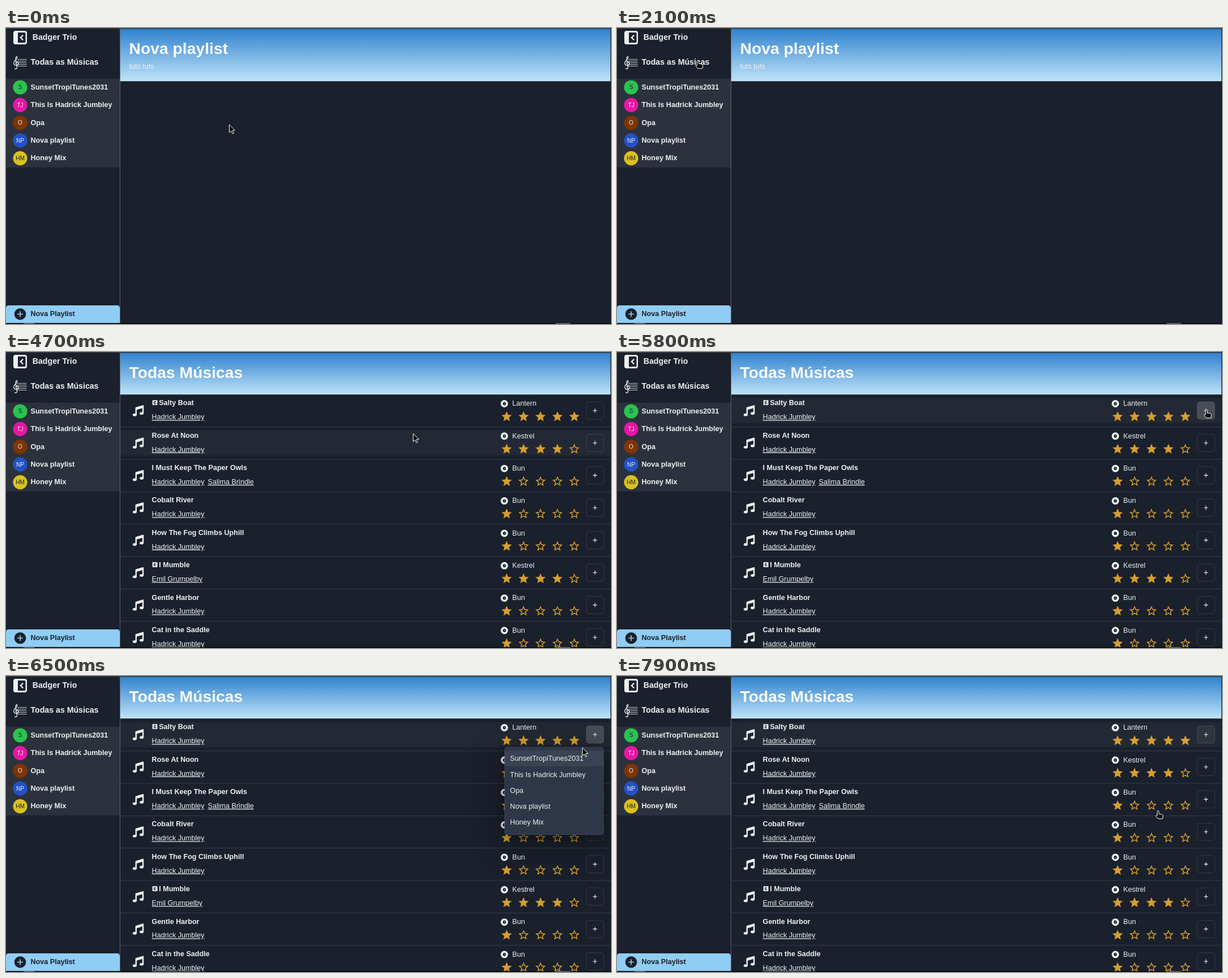
Write an HTML page that moves like this. It is 1069 by 524 pixels and loops after 8 s.

```html
<!DOCTYPE html>
<html lang="pt">
<head>
<meta charset="utf-8">
<style>
  html, body { margin: 0; width: 100%; height: 100%; overflow: hidden; background: #1a202c; }
  svg { display: block; width: 1069px; height: 524px; font: 12.58px "Liberation Sans", Arial, sans-serif; }
  text { fill: #eeeff0; }
  .bold { font-weight: bold; }
  .big { font-weight: bold; font-size: 14.15px; }
  .title { font-weight: bold; font-size: 28.3px; fill: #f8fbfe; }
  .link { text-decoration: underline; }
  .initials { font-size: 10.06px; text-anchor: middle; }
  .icon { fill: #eeeff0; }
  .gold { fill: #d69e2e; }
  .line { fill: #fff; fill-opacity: .16; }
  .box { stroke: #fff; stroke-opacity: .16; stroke-width: .8; }
  .cursor { fill: #000; stroke: #fff; stroke-width: 1; stroke-linejoin: round; }
  #panel { filter: drop-shadow(0 4px 8px rgba(0,0,0,.2)) drop-shadow(0 12px 31px rgba(0,0,0,.4)); }
</style>
</head>
<body>
<svg id="stage" viewBox="0 0 1069 524"></svg>
<script>
const ROW = 57.36, TOP = 75.3, ITEM = 28.3, MENU_TOP = 131.6;

const playlists = [
  ['SunsetTropiTunes2031', 'S', '#2ac350', '#1a202c'],
  ['This Is Hadrick Jumbley', 'TJ', '#e815a4', '#eeeff0'],
  ['Opa', 'O', '#7f3503', '#eeeff0'],
  ['Nova playlist', 'NP', '#2352c6', '#eeeff0'],
  ['Honey Mix', 'HM', '#dbc021', '#1a202c']
];
const star = 'Hadrick Jumbley';
const songs = [ // title, artists, album, rating, explicit
  ['Salty Boat', [star], 'Lantern', 5, true],
  ['Rose At Noon', [star], 'Kestrel', 4],
  ['I Must Keep The Paper Owls', [star, 'Salima Brindle'], 'Bun', 1],
  ['Cobalt River', [star], 'Bun', 1],
  ['How The Fog Climbs Uphill', [star], 'Bun', 1],
  ['I Mumble', ['Emil Grumpelby'], 'Kestrel', 4, true],
  ['Gentle Harbor', [star], 'Bun', 1],
  ['Cat in the Saddle', [star], 'Bun', 1]
];

const text = (x, y, s, cls = '', more = '') => `<text x="${x}" y="${y}" class="${cls}" ${more}>${s}</text>`;
const rect = (x, y, w, h, more = '') => `<rect x="${x}" y="${y}" width="${w}" height="${h}" ${more}/>`;
const use = (id, x, y, cls = 'icon') => `<use href="#${id}" x="${x}" y="${y}" class="${cls}"/>`;
const path = (id, scale, d) => `<path id="${id}" transform="scale(${scale})" d="${d}"/>`;

const defs = `<defs>
  <linearGradient id="sky" x2="0" y2="1"><stop stop-color="#3182ce"/><stop offset="1" stop-color="#bee3f8"/></linearGradient>
  ${path('note', .0383, 'M512 32c0-22-21-37-42-30.500L150 96c-13 4-22 16.500-22 30.500v261.400c-10-2.400-21-3.900-32-3.900-53 0-96 28.700-96 64s43 64 96 64 96-28.700 96-64V214.300l256-75v184.600c-10-2.400-21-3.900-32-3.900-53 0-96 28.700-96 64s43 64 96 64 96-28.700 96-64z')}
  ${path('full', .917, 'M12 17.270L18.180 21l-1.640-7.030L22 9.240l-7.190-.61L12 2 9.190 8.630 2 9.240l5.460 4.730L5.820 21z')}
  ${path('empty', .917, 'M22 9.240l-7.190-.62L12 2 9.190 8.630 2 9.240l5.460 4.730L5.820 21 12 17.270 18.180 21l-1.630-7.030zM12 15.400l-3.760 2.270 1-4.280-3.320-2.880 4.380-.38L12 6.100l1.710 4.040 4.380.38-3.320 2.880 1 4.280z')}
  <g id="disc"><circle r="4.700" fill="none" stroke="#eeeff0" stroke-width="3.600"/><circle r=".8"/></g>
  <path id="plus" d="M-3.700 -.55h3.150v-3.150h1.100v3.150h3.150v1.100h-3.150v3.150h-1.100v-3.150h-3.150z"/>
</defs>`;

function sidebar() {
  const rows = playlists.map(([name, initials, color, ink], i) => {
    const y = 105 + i * 31.4;
    return `<circle cx="25" cy="${y}" r="12.600" fill="${color}"/>` +
      text(25, y + 3.3, initials, 'initials', `style="fill:${ink}"`) + text(43.5, y + 3.7, name, 'bold');
  }).join('');
  const staff = [55, 58, 61, 64, 67].map(y => rect(20, y, 16.5, .8, 'class="icon"')).join('');
  return rect(0, 89.8, 201, 157, 'fill="#2c323d"') + rect(201, 1, 1, 522, 'fill="#5d6671"') +
    rect(13, 5, 24, 24, 'rx="4" class="icon"') +
    `<path d="M21 8h12q1.500 0 1.500 1.500v15q0 1.500-1.500 1.500h-12z" fill="#1a202c"/>
     <path d="M29.500 13.300l-3.700 3.700 3.700 3.700" fill="none" stroke="#eeeff0" stroke-width="2.300" stroke-linecap="round"/>` +
    text(46.8, 21.4, 'Badger Trio', 'big') + staff +
    `<path d="M18.600 63.300c-2-.5-1.600-3.300.7-3.300 3.300 0 3.700 6-.4 6.200-5.500.2-6.500-5.400-3.200-8.200 3-2.500 5.300-5.500 3.500-7.600-2.700.7-2.300 4-1.900 6.300l2.100 12.800c.4 3.300-3.500 3.700-4 1.500" fill="none" stroke="#eeeff0" stroke-width="1.300"/>` +
    text(43.5, 65.2, 'Todas as Músicas', 'big') + rows +
    `<path d="M0 522.500V496q0-5 5-5h191q5 0 5 5v26.500z" fill="#90cdf4"/>
     <circle cx="25" cy="506.500" r="10.300" fill="#1a202c"/>
     <path d="M20 506.500h10M25 501.500v10" stroke="#90cdf4" stroke-width="1.700"/>` +
    text(43.5, 510.2, 'Nova Playlist', 'bold', 'style="fill:#1a202c"');
}

const header = (h, title) => rect(202, 1.5, 866, h, 'fill="url(#sky)"') + text(217.5, 45.6, title, 'title');

function songRow([title, artists, album, rating, explicit], i) {
  const y = TOP + i * ROW;
  let out = use('note', 223.7, y + 18.8).replace('/>', ` transform=""/>`);
  if (explicit) out += rect(258.7, y + 10, 8.8, 8.8, 'rx="1" class="icon"') +
    `<path d="M264.900 ${y + 12.2}h-3v4.400h3M262 ${y + 14.4}h2.700" fill="none" stroke="#1a202c" stroke-width="1.100"/>`;
  out += text(explicit ? 270.2 : 257.6, y + 19.1, title, 'bold');
  artists.forEach((a, k) => out += text(257.6 + k * 99, y + 44, a, 'link'));
  out += use('disc', 880.6, y + 16.2) + text(894.6, y + 19.9, album);
  for (let k = 0; k < 5; k++) out += use(k < rating ? 'full' : 'empty', 873.6 + k * 29.9, y + 27.9, 'gold');
  return out + rect(1025.3, y + 13, 30.8, 30.8, `rx="4.700" class="box" fill="#fff" fill-opacity="0" id="add${i}"`) +
    use('plus', 1040.7, y + 28.4) + rect(202, y + ROW - .4, 866, .8, 'class="line"');
}

const menu = rect(881, 126.3, 174.800, 154.600, 'rx="4.700" fill="#2d3748" class="box" id="panel"') +
  rect(881.4, 0, 174, ITEM, 'fill="#fff" fill-opacity=".06" id="focus"') +
  playlists.map(([name], i) => text(890.6, 150.2 + i * ITEM, name)).join('');

document.getElementById('stage').innerHTML = defs + rect(0, 0, 1069, 524, 'fill="#1a202c"') + sidebar() +
  `<g id="empty-view">${header(92.7, 'Nova playlist')}${text(217.5, 72.4, 'tuts tuts')}</g>
   <g id="song-view">${header(73.8, 'Todas Músicas')}${rect(202, 0, 866, 44, 'fill="#fff" fill-opacity=".04" id="hover"')}${songs.map(songRow).join('')}</g>
   <g id="menu">${menu}</g>` +
  rect(0, 0, 1069, 1.2, 'fill="#3b3b3d"') + rect(1068, 1, 1, 522, 'fill="#10141c"') + rect(0, 522.5, 1069, 1.5, 'fill="#050608"') +
  rect(31, 522.5, 19, 1.5, 'fill="#66686b"') + rect(971, 522.5, 26, 1.5, 'fill="#66686b"') +
  `<g id="cursor" class="cursor">
     <path id="arrow" d="M0 0V14l3.300-3 2.300 5.200 2.200-1-2.300-5H10z"/>
     <path id="hand" d="M-1.400 8.500V1.200a1.400 1.400 0 0 1 2.800 0V5.500l5.600 1.200q2 .5 1.800 2.800l-.8 4.700H-.3L-4 9.300q.5-2 2.600-.8z"/>
   </g>`;

// scale each icon about its own corner
document.querySelectorAll('use').forEach(u => {
  u.setAttribute('transform', `translate(${u.getAttribute('x')} ${u.getAttribute('y')})`);
  u.removeAttribute('x');
  u.removeAttribute('y');
});

const el = id => document.getElementById(id);
const show = (id, on) => el(id).style.display = on ? '' : 'none';
const set = (id, name, value) => el(id).setAttribute(name, value);

const track = [ // time, x, y of the pointer
  [0, 394.5, 171], [500, 394.5, 171], [1000, 355.5, 141.5], [1200, 355.5, 141.5], [1900, 140.5, 57.5],
  [2000, 140.5, 57.5], [2100, 143, 57.5], [4000, 143, 57.5], [4500, 690, 160], [4600, 690, 160],
  [4700, 719.5, 144.5], [5400, 1041.5, 102.5], [6400, 1041.5, 102.5], [6500, 1018.5, 127], [7200, 956, 238.5], [8000, 956, 238.5]
];

function pointer(t) {
  const i = track.findIndex(k => k[0] > t);
  const [t0, x0, y0] = track[i - 1], [t1, x1, y1] = track[i];
  const p = (t - t0) / (t1 - t0), e = p * p * (3 - 2 * p);
  return [x0 + (x1 - x0) * e, y0 + (y1 - y0) * e];
}

function draw(t) {
  const [x, y] = pointer(t);
  const songsOn = t >= 3400, open = t > 5800 && t < 7900;
  const onButton = songsOn && x > 1025 && y > 88 && y < 119;
  const onLink = x < 201 && y > 45 && y < 76;
  const onItem = t > 6500 && y > MENU_TOP;

  set('cursor', 'transform', `translate(${x} ${y})`);
  show('hand', onButton || onLink || onItem);
  show('arrow', !(onButton || onLink || onItem));
  show('empty-view', !songsOn);
  show('song-view', songsOn);

  const row = t >= 5400 ? 0 : Math.floor((y - TOP) / ROW);
  const inRow = t >= 5400 || (y - TOP) % ROW > 6.3 && (y - TOP) % ROW < 50.3;
  show('hover', songsOn && x > 202 && row >= 0 && inRow);
  set('hover', 'y', TOP + row * ROW + 6.3);

  const press = Math.min(1, Math.max(0, (t - 5500) / 300));
  set('add0', 'fill-opacity', t >= 7900 ? .06 : onButton || open ? .08 + .09 * press : 0);

  show('menu', open);
  const grow = Math.min(1, (t - 5800) / 300), s = .8 + .2 * grow;
  set('menu', 'opacity', Math.max(0, grow));
  set('menu', 'transform', `translate(1056 126) scale(${s}) translate(-1056 -126)`);
  set('focus', 'y', MENU_TOP + ITEM * Math.max(0, Math.floor((y - MENU_TOP) / ITEM)));
}

const start = performance.now();
function tick(now) {
  const t = Math.max(0, now - start) % 8000;
  draw(Math.floor(t / 100) * 100);
  requestAnimationFrame(tick);
}
draw(0);
requestAnimationFrame(tick);
</script>
</body>
</html>
```
